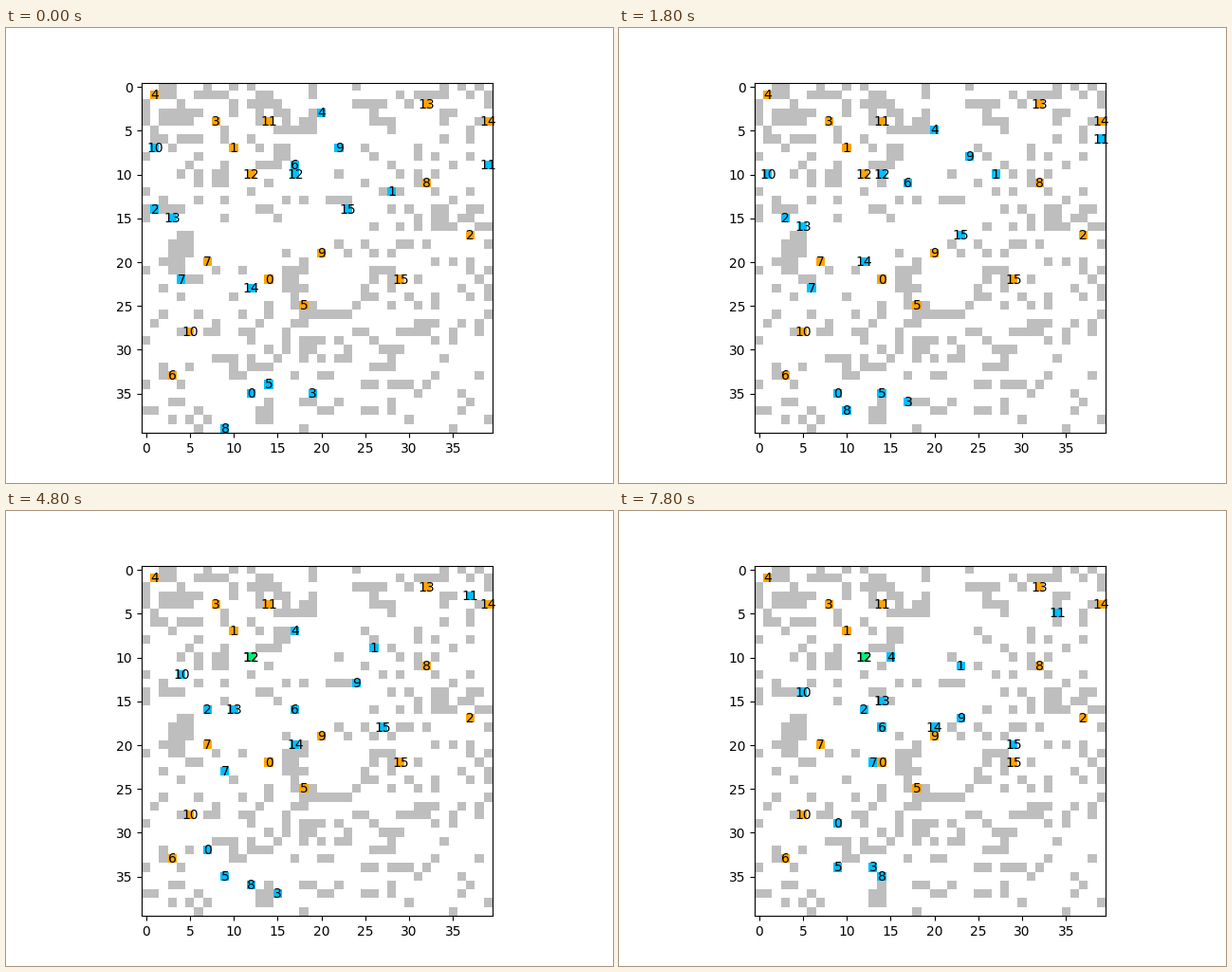
Animation of 640 by 480 pixels, one loop 8 s. Source, as a matplotlib script:

```python
import numpy as np
import matplotlib.pyplot as plt
from matplotlib.animation import FuncAnimation
from matplotlib.colors import to_rgb

SIZE = 40
TICK_MS = 200
TICKS_PER_STEP = 3
TICKS = 40

WHITE, WALL, AGENT, GOAL, DONE = map(
    to_rgb, ("white", "#bebebe", "deepskyblue", "orange", "#00ee76"))

# (column, row) of each agent's goal
GOALS = [(14, 22), (10, 7), (37, 17), (8, 4), (1, 1), (18, 25), (3, 33), (7, 20),
         (32, 11), (20, 19), (5, 28), (14, 4), (12, 10), (32, 2), (39, 4), (29, 22)]

# Start cell and one move per step; a dot waits
ROUTES = [
    ((12, 35), "LLLUUULLUURRU"),
    ((28, 12), "UUL.DLUULLDLD"),
    ((1, 14), "DRRDRRRRRRRRR"),
    ((19, 35), "LLDDRLLLUULUL"),
    ((20, 3), "DD.DLLLDDDDLL"),
    ((14, 34), "..DLLLLLLRU.."),
    ((17, 9), ".DDDDDDDDLLDL"),
    ((4, 22), "DRRDRRURRRRRU"),
    ((9, 39), "RUUUR..RUR..R"),
    ((22, 7), "RRDDDDDDDDLDD"),
    ((1, 7), "DDDDDRRRR..DD"),
    ((39, 9), "UUUUUULLLDDLL"),
    ((17, 10), "LLLLL........"),
    ((3, 15), "RDRRRRRRRRURR"),
    ((12, 23), "UUURRRRRURURR"),
    ((23, 14), "DDDRRRRDDDRR."),
]
MOVES = {"U": (0, -1), "D": (0, 1), "L": (-1, 0), "R": (1, 0), ".": (0, 0)}

# Large wall blocks: column, row, width, height
BLOCKS = [
    (6, 1, 4, 1), (13, 1, 2, 2), (3, 0, 1, 2), (2, 4, 3, 1), (0, 3, 1, 1),
    (15, 5, 4, 1), (13, 3, 1, 2), (15, 7, 1, 3), (6, 10, 1, 2), (8, 10, 2, 2),
    (16, 13, 3, 1), (21, 13, 4, 1), (2, 14, 2, 1), (33, 14, 2, 2), (33, 16, 3, 1),
    (4, 17, 2, 1), (3, 18, 3, 1), (3, 19, 2, 2), (5, 22, 2, 1), (16, 21, 2, 3),
    (17, 24, 1, 2), (18, 26, 6, 1), (16, 28, 1, 2), (7, 28, 2, 1), (8, 31, 3, 1),
    (10, 32, 1, 2), (12, 32, 3, 1), (13, 37, 2, 2), (14, 36, 1, 1), (29, 28, 4, 1),
    (18, 29, 2, 2), (28, 34, 2, 1), (31, 1, 4, 1), (34, 3, 2, 1), (18, 4, 2, 1),
]


def walk(start, moves):
    return np.cumsum([start] + [MOVES[m] for m in moves], axis=0)


PATHS = np.array([walk(*route) for route in ROUTES])


def build_walls():
    rng = np.random.default_rng(12)
    chance = np.full((SIZE, SIZE), 0.2)
    chance[12:25, 5:23] = 0.06
    walls = rng.random((SIZE, SIZE)) < chance
    for x, y, w, h in BLOCKS:
        walls[y:y + h, x:x + w] = True
    for x, y in np.vstack([PATHS.reshape(-1, 2), GOALS]):
        walls[y, x] = False
    return walls


base = np.where(build_walls()[..., None], WALL, WHITE)


def board(step):
    cells = base.copy()
    for x, y in PATHS[:, step]:
        cells[y, x] = AGENT
    for (x, y), spot in zip(GOALS, PATHS[:, step]):
        cells[y, x] = DONE if (x, y) == tuple(spot) else GOAL
    return cells


def label(i, cell):
    return ax.text(*cell, str(i), ha="center", va="center", fontsize=10)


fig, ax = plt.subplots(figsize=(6.4, 4.8), dpi=100)
image = ax.imshow(board(0), interpolation="nearest")
for i, goal in enumerate(GOALS):
    label(i, goal)
tags = [label(i, path[0]) for i, path in enumerate(PATHS)]


def update(tick):
    step = tick // TICKS_PER_STEP
    image.set_data(board(step))
    for tag, cell in zip(tags, PATHS[:, step]):
        tag.set_position(cell)
    return [image, *tags]


anim = FuncAnimation(fig, update, frames=TICKS, interval=TICK_MS,
                     repeat=True, repeat_delay=0)
plt.show()
```
